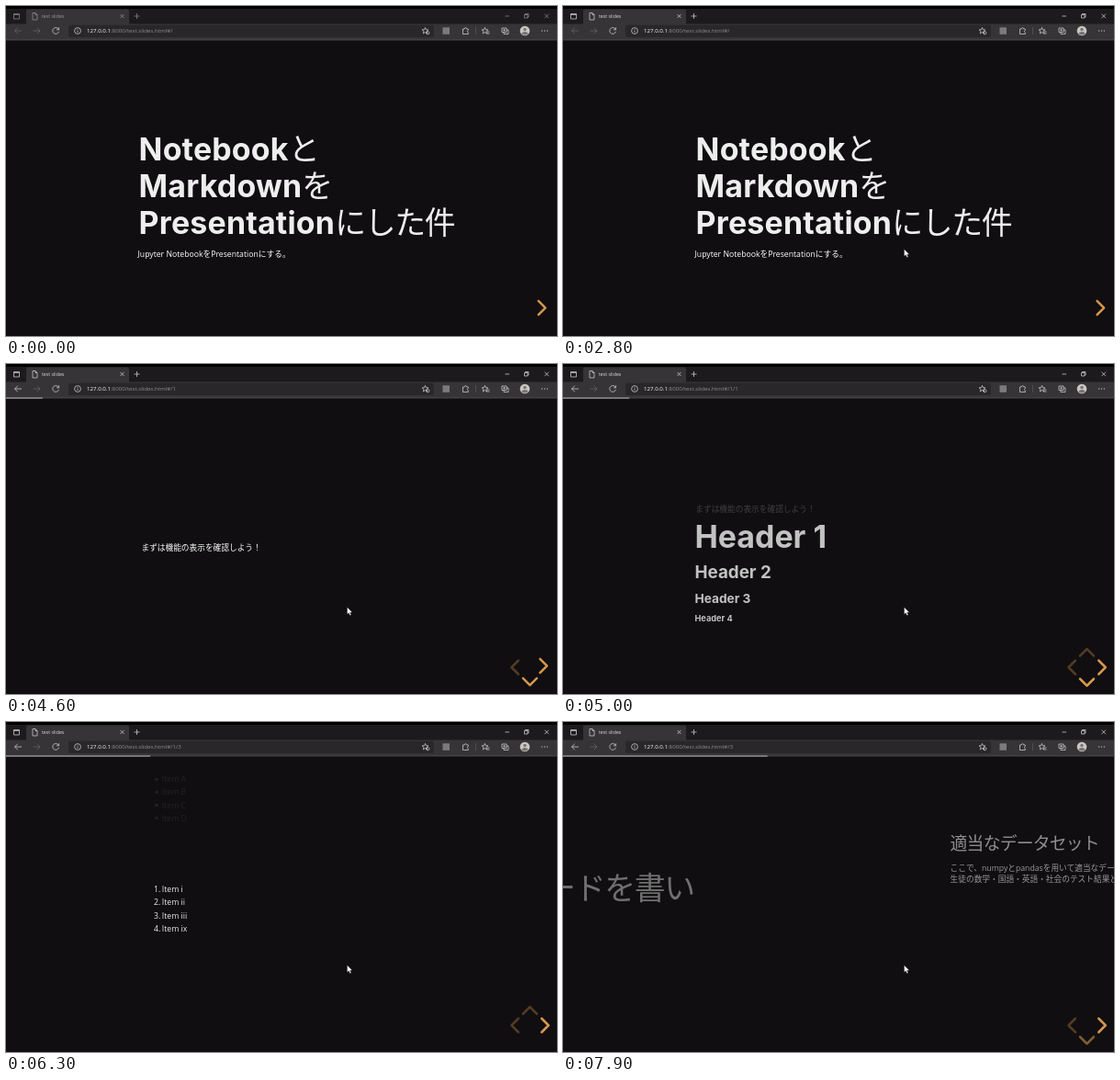
Recreate the animation shown at these times as an HTML page. Size 600x359 px, loop 8000 ms.

```html
<!DOCTYPE html>
<html lang="ja">
<head>
<meta charset="utf-8">
<title>test slides</title>
<style>
  html, body { margin: 0; width: 100%; height: 100%; overflow: hidden; background: #100e10; }
  svg { display: block; width: 600px; height: 359px; }
  text { font-family: "Open Sans", "Noto Sans CJK JP", sans-serif; white-space: pre; }
  .body { font-size: 8.7px; fill: #fff; }
  .head { font-family: Inter, "Noto Sans CJK JP", sans-serif; font-weight: 700; fill: #eee; }
  .kana { font-family: "Noto Sans CJK JP", sans-serif; font-weight: 400; letter-spacing: -.04em; fill: #eee; }
  .h1 { font-size: 33.9px; }
  .h2 { font-size: 18.8px; }
  .h3 { font-size: 13.7px; }
  .h4 { font-size: 9.2px; }
  .title { letter-spacing: .2px; }
  .line { fill: none; stroke: #d0d0d0; stroke-width: .75; }
  .arrow { fill: none; stroke: #eba654; stroke-width: 2.5; stroke-linecap: round; stroke-linejoin: round; }
</style>
</head>
<body>
<svg viewBox="0 0 600 359">
  <defs><clipPath id="page"><rect y="37" width="600" height="322"/></clipPath></defs>
  <rect width="600" height="359" fill="#100e10"/>

  <g clip-path="url(#page)">
    <g class="slide">
      <text class="head h1 title" x="144.6" y="168">Notebook<tspan class="kana">と</tspan></text>
      <text class="head h1 title" x="144.6" y="208">Markdown<tspan class="kana">を</tspan></text>
      <text class="head h1 title" x="144.6" y="248">Presentation<tspan class="kana">にした件</tspan></text>
      <text class="body" x="143.5" y="273">Jupyter NotebookをPresentationにする。</text>
    </g>
    <g id="stack">
      <g class="slide"><text class="body" x="144.3" y="203.4">まずは機能の表示を確認しよう！</text></g>
      <g class="slide">
        <text class="head h1" x="143.5" y="159.5">Header 1</text>
        <text class="head h2" x="143.5" y="192.5">Header 2</text>
        <text class="head h3" x="143.5" y="218.8">Header 3</text>
        <text class="head h4" x="143.5" y="239">Header 4</text>
      </g>
      <g class="slide" id="bullets"></g>
      <g class="slide" id="numbers"></g>
    </g>
    <g class="slide">
      <text class="kana h1" x="145.3" y="192.7">では実際にコードを書い</text>
      <text class="kana h1" x="145.3" y="232.7">てみよう！</text>
    </g>
    <g class="slide">
      <text class="kana h2" x="147" y="139">適当なデータセット</text>
      <text class="body" x="147" y="162.3">ここで、numpyとpandasを用いて適当なデータを作る。</text>
      <text class="body" x="147" y="173.5">生徒の数学・国語・英語・社会のテスト結果とする。</text>
    </g>
    <path class="arrow" id="left" d="M558 322.5l-7.5 7.5 7.5 7.5"/>
    <path class="arrow" id="up" d="M563 317.5l7.5-7.5 7.5 7.5"/>
    <path class="arrow" id="down" d="M563 342.5l7.5 7.5 7.5-7.5"/>
    <path class="arrow" id="right" d="M583.3 322.5l7.5 7.5-7.5 7.5"/>
  </g>

  <rect width="600" height="20" fill="#1d1a1d"/>
  <rect width="600" height="3" fill="#000"/>
  <path d="M22 20V5.5q0-2 2-2h108q2 0 2 2V20z" fill="#363436"/>
  <rect y="19.5" width="600" height="17" fill="#363436"/>
  <rect y="36.3" width="600" height="1.1" fill="#525052"/>
  <rect x="68" y="20.7" width="398" height="13.2" rx="2" fill="#292729"/>
  <g id="titlebar">
    <path class="line" d="M8.5 8.5h6v5.5h-6zM8.5 9.5h6M29 7.5h3l2 2v5.500h-5zM32 7.5v2h2M124.5 9l4 4m0-4l-4 4M139.5 11h6m-3-3v6M543.5 11h4.5M564.500 9.5h3.5v3.5h-3.5zM565.5 9.5v-1h3.5v3.5h-1M586.5 8.700l4.500 4.500m0-4.500l-4.500 4.500"/>
    <text x="39" y="13" font-size="5.25" fill="#dcdcdc">test slides</text>
  </g>
  <path class="line" id="back" d="M17 27H9.500m3.300-3.300L9.500 27l3.300 3.300"/>
  <path class="line" opacity=".3" d="M29.500 27H37m-3.300-3.300L37 27l-3.300 3.300"/>
  <path class="line" d="M57.300 25.500a3.400 3.400 0 1 0 .2 2.300M57.600 23.300v2.500h-2.500"/>
  <circle class="line" cx="78" cy="27" r="3.4"/>
  <path class="line" d="M78 26.5v2.3m0-3.9v.8"/>
  <text y="29.2" x="88" font-size="6.15" fill="#8f8f8f"><tspan fill="#fff">127.0.0.1</tspan>:8000/test.slides.html#/<tspan id="hash"></tspan></text>
  <g id="tools">
    <path class="line star" transform="translate(456.5 27)"/>
    <circle class="line" cx="459.3" cy="29.2" r="1.6"/>
    <rect x="475.5" y="23.3" width="7.5" height="7.5" fill="#7c7a7c"/>
    <path class="line" d="M497.5 25h1.700a1.300 1.300 0 0 1 2.600 0h1.500v1.500a1.300 1.300 0 0 0 0 2.400v1.600h-5.800z"/>
    <path d="M511.5 23v8" stroke="#5b5b5b" stroke-width=".7"/>
    <path class="line star" transform="translate(521.5 27)"/>
    <path class="line" d="M524 28h2.500M523.500 30h3M540 24h5v4.500h-5zM542 28.500v2h5V26h-2M542.500 25v2.500m-1.200-1.200h2.400"/>
    <circle cx="565" cy="27" r="5.3" fill="#c9c7c5"/>
    <circle cx="565" cy="25.5" r="1.7" fill="#77736f"/>
    <path d="M561.5 30.5q0-2.500 3.500-2.500t3.500 2.500q-3.500 2-7 0" fill="#77736f"/>
    <path d="M583 27h7" stroke="#d0d0d0" stroke-width="1.1" stroke-dasharray="1.2 1.7"/>
  </g>
  <rect id="progress" y="36.3" height="1.5" fill="#8e8c8e"/>
  <path id="cursor" d="M371.5 264.500v7.800l1.800-1.600 1.200 2.800 1.400-.6-1.200-2.700h2.400z" fill="#fff" stroke="#000" stroke-width=".3"/>
</svg>
<script>
const $ = id => document.getElementById(id);
const LOOP = 8000, FOCUS = 200, SLIDE_MS = 800, FADE_MS = 300;
const ACROSS = 635;     // horizontal travel of a slide
const BAR_STEP = 40;    // progress bar growth per slide

// start: key press; travel: vertical distance; nav: visible arrows
const slides = [
  { start: -SLIDE_MS, hash: '', nav: 'right' },
  { start: 3890, hash: '1', travel: 52, nav: 'left down right' },
  { start: 4700, hash: '1/1', travel: 210, nav: 'left up down right' },
  { start: 5227, hash: '1/2', travel: 120, nav: 'left up down right' },
  { start: 5860, hash: '1/3', travel: 120, nav: 'left up right' },
  { start: 6730, hash: '2', nav: 'left right' },
  { start: 7731.5, hash: '3', nav: 'left down right' }
];
const views = document.querySelectorAll('.slide');
const arrowAlpha = { left: .3, up: .3, down: .9, right: .9 };

const listRows = (names, marker) => names.map((name, i) => {
  const y = 176.5 + i * 14.1;
  return marker(i, y) + `<text class="body" x="169.8" y="${y}">Item ${name}</text>`;
}).join('');
$('bullets').innerHTML = listRows(['A', 'B', 'C', 'D'],
  (i, y) => `<circle cx="164" cy="${y - 3.2}" r="1.8" fill="#fff"/>`);
$('numbers').innerHTML = listRows(['i', 'ii', 'iii', 'ix'],
  (i, y) => `<text class="body" x="161" y="${y}">${i + 1}.</text>`);

const starPoints = Array.from({ length: 10 }, (_, i) => {
  const r = i % 2 ? 1.6 : 3.6, a = i * Math.PI / 5;
  return [r * Math.sin(a), -r * Math.cos(a)].map(v => v.toFixed(2));
});
document.querySelectorAll('.star').forEach(s => s.setAttribute('d', `M${starPoints.join('L')}z`));

const clamp = v => Math.max(0, Math.min(1, v));
function bezier(x1, y1, x2, y2) {
  const curve = (a, b, s) => 3 * a * s * (1 - s) ** 2 + 3 * b * s * s * (1 - s) + s ** 3;
  return x => {
    if (x <= 0 || x >= 1) return clamp(x);
    let lo = 0, hi = 1;
    for (let i = 0; i < 24; i++) {
      const mid = (lo + hi) / 2;
      if (curve(x1, x2, mid) < x) lo = mid; else hi = mid;
    }
    return curve(y1, y2, lo);
  };
}
const slideEase = bezier(.26, .86, .44, .985);
const easeOut = bezier(0, 0, .58, 1);

// Two-second hint: out, back past rest, settle, 200 ms each
function bounce(ms) {
  const stops = [0, 5, -2.4, 0], step = ms / 200 - 1, i = Math.floor(step);
  if (i < 0 || i > 2) return 0;
  return stops[i] + (stops[i + 1] - stops[i]) * easeOut(step - i);
}
const move = (el, x, y) => el.setAttribute('transform', `translate(${x} ${y})`);

function draw(t) {
  const entered = slides.map(s => slideEase((t - s.start) / SLIDE_MS));
  const current = slides.findLastIndex(s => t >= s.start);
  const [, first, second] = slides;

  views.forEach((view, i) => {
    const inn = entered[i], out = entered[i + 1] || 0, stacked = i > 0 && i < 5;
    const { travel } = slides[i];
    if (stacked) move(view, 0, travel * ((i > 1 ? 1 - inn : 0) - (i < 4 ? out : 0)));
    else move(view, ACROSS * (1 - inn - out), 0);
    view.setAttribute('opacity', inn * (1 - out));
  });
  move($('stack'), ACROSS * (1 - entered[1] - entered[5]), 0);

  const fade = clamp((t - slides[current].start) / FADE_MS);
  const shown = (name, i) => i >= 0 && slides[i].nav.split(' ').includes(name) ? 1 : 0;
  for (const name in arrowAlpha) {
    const before = shown(name, current - 1), now = shown(name, current);
    $(name).setAttribute('opacity', arrowAlpha[name] * (before + (now - before) * fade));
  }
  const settled = t >= second.start;
  const hint = t < first.start ? bounce((t + 550) % 2000) : 0;
  move($('right'), settled ? 0 : hint - 1.7, settled ? 0 : -1.6);
  move($('down'), 0, settled ? 0 : bounce(t - first.start));

  const width = entered.slice(1).reduce((sum, e) => sum + e, 0) * BAR_STEP;
  $('progress').setAttribute('width', width);
  $('hash').textContent = slides[current].hash;
  $('back').setAttribute('opacity', current ? 1 : .3);
  $('titlebar').setAttribute('opacity', t < FOCUS ? .6 : 1);
  $('cursor').setAttribute('opacity', t < FOCUS ? 0 : 1);
}

const begin = performance.now();
function tick() {
  draw((performance.now() - begin) % LOOP);
  requestAnimationFrame(tick);
}
tick();
</script>
</body>
</html>
```
